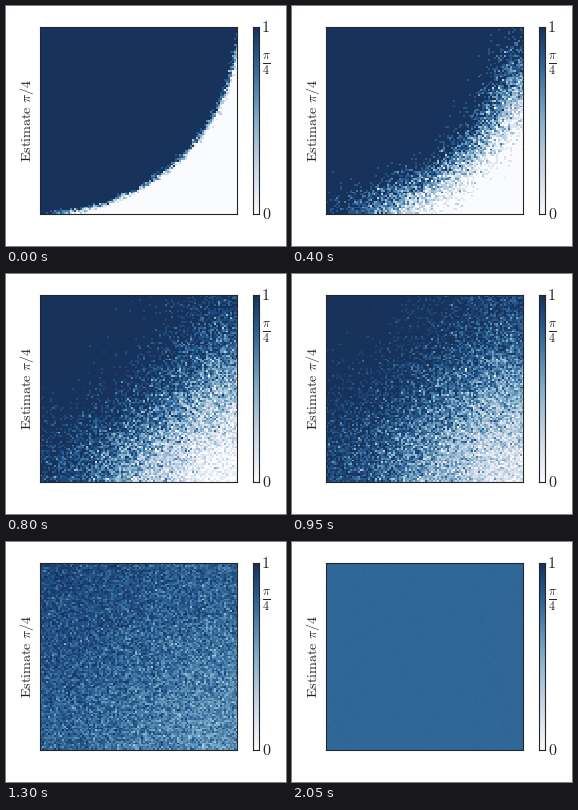
Recreate the animation shown at these times as a matplotlib script. Size 280 by 240 pixels, loop 4950 ms.

```python
import numpy as np
import matplotlib.pyplot as plt
from matplotlib.animation import FuncAnimation
from matplotlib.colors import LinearSegmentedColormap

W, H, DPI = 280, 240, 100
CELLS, DRAWS = 100, 48
FRAMES, STEP, SETTLED = 99, 50, 38
TARGET = np.pi / 4
INK = "#262626"

plt.rcParams["mathtext.fontset"] = "cm"
cmap = LinearSegmentedColormap.from_list("deep", [
    (0, "#f9fbfe"), (0.25, "#c9d5e5"), (0.5, "#83b0cb"),
    (TARGET, "#306799"), (0.9, "#1f4a7d"), (1, "#17325b")])

rng = np.random.default_rng(4)
mid = (np.arange(CELLS) + 0.5) / CELLS
x0, y0 = np.meshgrid(mid, mid)

# Draws of one cell share part of their offset, so a few cells stray far.
shared = rng.standard_normal((2, 1, CELLS, CELLS))
single = rng.standard_normal((2, DRAWS, CELLS, CELLS))
dx, dy = 0.4 * shared + 0.9 * single


def fold(u):
    """Reflect coordinates back into the unit interval."""
    return np.abs((u + 1) % 2 - 1)


def estimate(k):
    """Share of random draws around each cell that hit the quarter disc."""
    k = min(k, SETTLED)
    spread = 0.011 + 0.008 * k + 7e-7 * k**4
    n = min(DRAWS, round(6 * np.exp((k / 22)**2)))
    x = fold(x0 + spread * dx[:n])
    y = fold(y0 + spread * dy[:n])
    share = (x**2 + y**2 < 1).mean(axis=0)
    return TARGET + (share - TARGET) * 0.72**max(0, k - 29)


def panel(left, top, right, bottom):
    ax = fig.add_axes([left / W, 1 - bottom / H,
                       (right - left) / W, (bottom - top) / H])
    ax.set(xticks=[], yticks=[])
    for side in ax.spines.values():
        side.set(linewidth=0.8, edgecolor=INK)
    return ax


def label(x, y, text, size, **kw):
    fig.text(x / W, 1 - y / H, text, size=size, color=INK,
             ha="center", va="center", **kw)


fig = plt.figure(figsize=(W / DPI, H / DPI), dpi=DPI, facecolor="white")
field = panel(34, 21, 231, 208)
image = field.imshow(estimate(0), cmap=cmap, vmin=0, vmax=1,
                     aspect="auto", interpolation="nearest")
bar = panel(247, 21, 253, 208)
bar.imshow(np.linspace(1, 0, 256)[:, None], cmap=cmap, vmin=0, vmax=1,
           aspect="auto")

label(21, 114, r"$\mathrm{Estimate}\ \pi/4$", 10.2, rotation=90)
label(259.5, 21.5, "$1$", 11.5)
label(260.5, 208.5, "$0$", 11.5)
label(260.5, 59, r"$\frac{\pi}{4}$", 12.5)


def update(k):
    image.set_data(estimate(k))
    return [image]


anim = FuncAnimation(fig, update, frames=FRAMES, interval=STEP,
                     repeat=True, repeat_delay=0)
plt.show()
```
